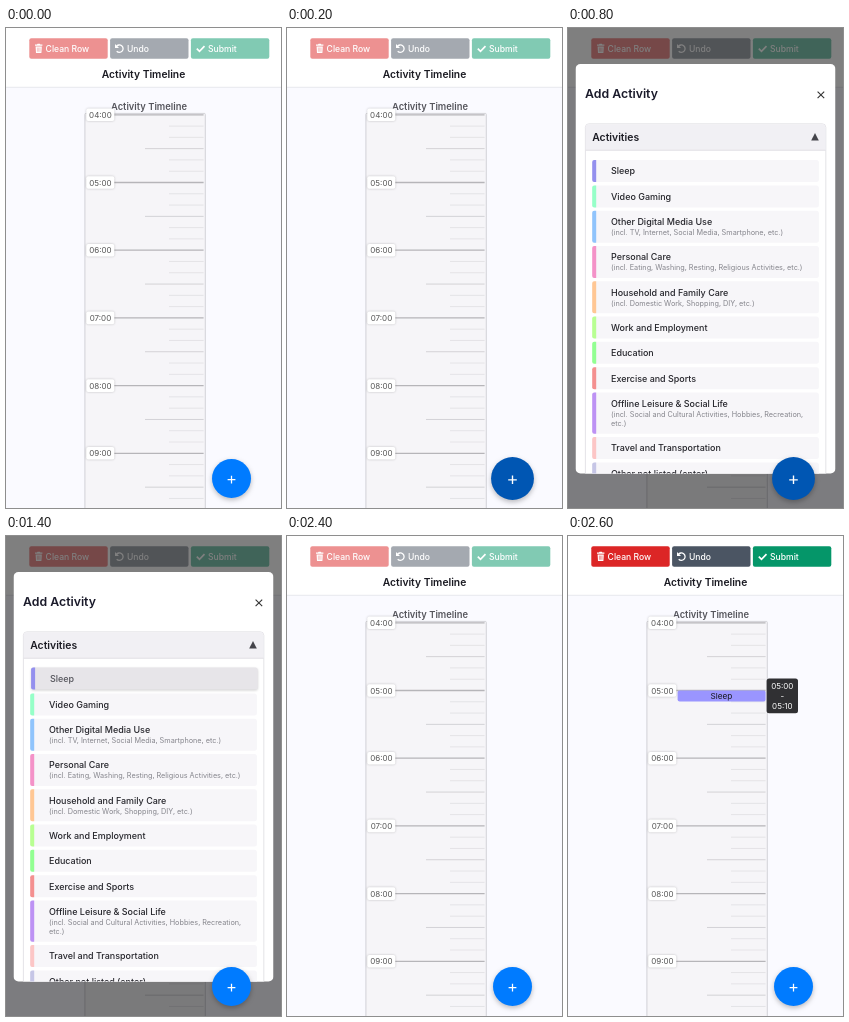
Recreate the animation shown at these times as an HTML page. Size 275 px wide and 480 px high, loop 3400 ms.

```html
<!DOCTYPE html>
<html lang="en">
<head>
<meta charset="utf-8">
<title>Activity Timeline</title>
<style>
  html, body { margin: 0; width: 100%; height: 100%; overflow: hidden; background: #fafaff; }
  svg { display: block; width: 275px; height: 480px; font-family: Inter, Roboto, sans-serif; }
  .mid { text-anchor: middle; }
  .medium { font-weight: 500; }
  .semi { font-weight: 600; }
  .hidden { display: none; }
  #actions { opacity: .5; }
  #actions.on { opacity: 1; }
  #fab circle { fill: #007bff; filter: drop-shadow(0 2.5px 2.5px rgba(0, 0, 0, .26)); }
  #fab.hover circle { fill: #0056b3; }
  #fab.hover { transform: translate(225.5px, 450.5px) scale(1.1); }
  #fab { transform: translate(225.5px, 450.5px); }
  .tag { filter: drop-shadow(0 .6px .8px rgba(0, 0, 0, .22)); }
  .item .back { fill: #f7f6f9; }
  .item.hover { transform: translate(.9px, -.6px); }
  .item.hover .back { fill: #e7e5e9; filter: drop-shadow(0 1px 1px rgba(0, 0, 0, .18)); }
  .item.hover .name { fill: #55555c; }
</style>
</head>
<body>
<svg id="stage" viewBox="0 0 275 480" xmlns="http://www.w3.org/2000/svg"></svg>
<script>
const LOOP = 3400;
const HOUR = 67.7;
const TOP = 86.8;

const STEPS = [
  { at: 0 },
  { at: 200, fab: true },
  { at: 400, fab: true, modal: true },
  { at: 1400, modal: true, pick: true },
  { at: 1600 },
  { at: 2600, done: true }
];

const ITEMS = [
  ['#9490ee', 132, 'Sleep'],
  ['#96ffc8', 157.4, 'Video Gaming'],
  ['#90c4fc', 182.8, 'Other Digital Media Use', '(incl. TV, Internet, Social Media, Smartphone, etc.)'],
  ['#f492c8', 218, 'Personal Care', '(incl. Eating, Washing, Resting, Religious Activities, etc.)'],
  ['#ffc794', 253.2, 'Household and Family Care', '(incl. Domestic Work, Shopping, DIY, etc.)'],
  ['#b8ff92', 288.4, 'Work and Employment'],
  ['#92ff92', 313.8, 'Education'],
  ['#f49090', 339.2, 'Exercise and Sports'],
  ['#bd92f4', 364.6, 'Offline Leisure & Social Life', '(incl. Social and Cultural Activities, Hobbies, Recreation,', 'etc.)'],
  ['#fcc6c6', 409, 'Travel and Transportation'],
  ['#c6c6e6', 434.4, 'Other not listed (enter)']
];

const rect = (x, y, w, h, fill, r = 0, more = '') =>
  `<rect x="${x}" y="${y}" width="${w}" height="${h}" rx="${r}" fill="${fill}" ${more}/>`;
const line = (x1, x2, y, color, width) =>
  `<path d="M${x1} ${y}H${x2}" stroke="${color}" stroke-width="${width}"/>`;
const text = (x, y, size, fill, str, cls = '') =>
  `<text x="${x}" y="${y}" font-size="${size}" fill="${fill}" class="${cls}">${str.replace('&', '&amp;')}</text>`;

function header() {
  const button = (x, w, color, label, tx) =>
    rect(x, 10.2, w, 20.6, color, 2) + text(tx, 23.6, 8.6, '#fff', label, 'medium');
  const trash = '<path d="M29 16.6h2l.6-.8h2.2l.6.8h2v1.2H29zM29.6 18.4h6.2l-.4 6.6h-5.4z" fill="#fff"/>' +
    '<path d="M31.4 19.6v4.2M32.7 19.6v4.2M34 19.6v4.2" stroke="#dc2626" stroke-width=".5"/>';
  const undo = '<path d="M110.3 18.6A3.7 3.7 0 1 1 110.7 23.2" fill="none" stroke="#fff" stroke-width="1.3"/>' +
    '<path d="M109 15.9v4h4z" fill="#fff"/>';
  const check = '<path d="M190.8 20.6l2.7 2.7 5-5.2" fill="none" stroke="#fff" stroke-width="1.7"/>';
  return rect(0, 0, 275, 59, '#fff') + line(0, 275, 59.3, '#e4e5ea', .8) +
    '<g id="actions">' +
    button(23.3, 78.4, '#dc2626', 'Clean Row', 39.6) + trash +
    button(104.1, 78.4, '#4b5563', 'Undo', 121) + undo +
    button(184.9, 78.4, '#059669', 'Submit', 202) + check +
    '</g>' + text(137.5, 49.6, 10.3, '#1a1a22', 'Activity Timeline', 'mid semi');
}

function timeline() {
  let out = text(143, 82, 9.4, '#55555c', 'Activity Timeline', 'mid semi') +
    rect(78.9, 85.4, 120.4, 420, '#f6f5f8', 1, 'stroke="#cfced3" stroke-width=".9"');
  for (let i = 0; i < 36; i++) {
    const y = TOP + i * HOUR / 6;
    if (i % 6 === 0) out += line(108, 197.6, y, '#b6b5b9', 1.3);
    else if (i % 6 === 3) out += line(139, 197.6, y, '#d3d2d6', 1);
    else out += line(163, 197.6, y, '#e2e1e5', .9);
  }
  for (let h = 0; h < 6; h++) {
    const y = TOP + h * HOUR;
    out += rect(80.3, y - 6.3, 28, 12.6, '#fff', 2, 'class="tag"') +
      text(94.4, y + 3, 8, '#555', `0${h + 4}:00`, 'mid');
  }
  return out;
}

function entry() {
  return '<g id="entry">' +
    rect(109.6, 154.4, 88, 11.2, '#9a95ff', 2) +
    text(153.4, 163, 8.2, '#16161c', 'Sleep', 'mid') +
    rect(198.6, 142.6, 31.4, 34.6, '#303033', 2.5) +
    text(214.3, 153.2, 8, '#fff', '05:00', 'mid') +
    text(214.3, 162.8, 8, '#fff', '-', 'mid') +
    text(214.3, 172.6, 8, '#fff', '05:10', 'mid') + '</g>';
}

function item([color, y, name, ...notes], i) {
  const h = 22 + (notes.length ? 10 : 0) + (notes.length > 1 ? 9.2 : 0);
  return `<g class="item" ${i ? '' : 'id="pick"'}>` +
    rect(24.3, y, 226.6, h, '', 2.5, 'class="back"') +
    `<path d="M28.2 ${y}v${h}h-2a2 2 0 0 1-2-2v${4 - h}a2 2 0 0 1 2-2z" fill="${color}"/>` +
    text(43, y + 14.3, 8.96, '#26262c', name, 'name medium') +
    notes.map((s, n) => text(43, y + 24.4 + n * 9.2, 7.27, '#85858c', s)).join('') + '</g>';
}

function modal() {
  return '<g id="modal">' + rect(0, 0, 275, 480, '#000', 0, 'opacity=".5"') +
    '<clipPath id="card"><rect x="7.5" y="36" width="260" height="409.5" rx="5"/></clipPath>' +
    '<g clip-path="url(#card)">' + rect(7.5, 36, 260, 410, '#fff') +
    text(17, 70.4, 12.3, '#1a1a2a', 'Add Activity', 'semi') +
    '<path d="M249.6 63.6l6.6 6.6m0-6.6l-6.6 6.6" stroke="#333" stroke-width="1.1"/>' +
    rect(17.4, 95.8, 240.4, 400, '#fff', 3.5, 'stroke="#dddce1" stroke-width=".8"') +
    '<path d="M17.8 122.4V99.4a3.2 3.2 0 0 1 3.2-3.2h233.2a3.2 3.2 0 0 1 3.2 3.2v23z" fill="#f1f0f4"/>' +
    line(17.4, 257.8, 122.2, '#dddce1', .8) +
    text(24.2, 112.8, 10.4, '#1c1c24', 'Activities', 'semi') +
    '<path d="M243.2 112.4h7.6l-3.8-7.4z" fill="#44444a"/>' +
    ITEMS.map(item).join('') + '</g></g>';
}

const fab = '<g id="fab"><circle r="19.5"/>' +
  '<path d="M-3.9 1.2h7.8M0-2.7v7.8" stroke="#fff" stroke-width="1.25"/></g>';

const $ = id => document.getElementById(id);
$('stage').innerHTML = rect(0, 0, 275, 480, '#fafaff') + timeline() + header() + entry() + modal() + fab;

function draw() {
  const t = performance.now() % LOOP;
  const s = STEPS.filter(step => step.at <= t).pop();
  $('fab').classList.toggle('hover', !!s.fab);
  $('modal').classList.toggle('hidden', !s.modal);
  $('pick').classList.toggle('hover', !!s.pick);
  $('entry').classList.toggle('hidden', !s.done);
  $('actions').classList.toggle('on', !!s.done);
  requestAnimationFrame(draw);
}
draw();
</script>
</body>
</html>
```
